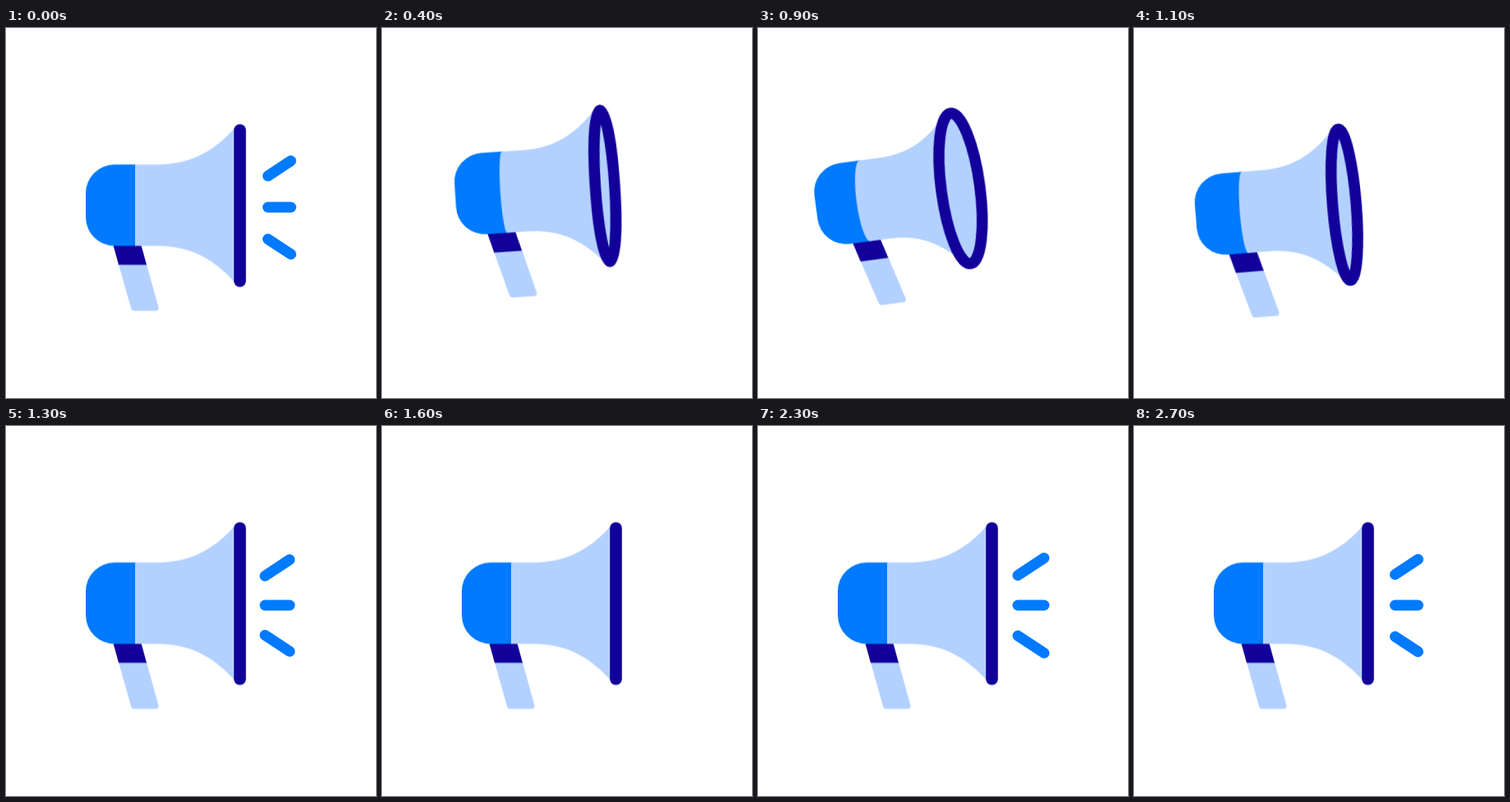
An HTML page without scripts that plays this animation: 450x450 px, repeating every 3.4 s.

```html
<!DOCTYPE html>
<html lang="en">
<head>
<meta charset="utf-8">
<title>Megaphone</title>
<style>
  @property --open { syntax: "<number>"; inherits: true; initial-value: 0; }

  html, body { margin: 0; width: 100%; height: 100%; overflow: hidden; background: #fff; }
  svg { display: block; width: 100%; height: 100%; }

  .bright { fill: #007aff; }
  .pale { fill: #b3d1ff; }
  .navy { fill: #12009a; }

  /* --open turns the mouth of the horn towards the viewer */
  .megaphone { animation: swing 3400ms step-end infinite; }
  .cap { transform: translateX(calc(var(--open) * -.66px)); }
  .seam { rx: calc(var(--open) * 1.35px); ry: 49.5px; }
  .horn { transform: translateX(calc(var(--open) * -.66px)) scaleX(calc(1 - var(--open) * .0104)); }
  .rim {
    transform: translateX(calc(127.5px - var(--open) * 2px));
    stroke: #12009a;
    stroke-linecap: round;
  }
  .mouth { rx: calc(var(--open) * 3.1px); ry: 92.25px; stroke-width: 13.5px; }
  .edge { stroke-width: 14.6px; opacity: calc(1 - var(--open) * 10); }

  .rays {
    fill: none;
    stroke: #007aff;
    stroke-width: 13px;
    stroke-linecap: round;
    animation: burst 3400ms step-end infinite;
  }

  @keyframes swing {
    0%     { transform: translate(0px, 0px) rotate(0deg); --open: 0; animation-timing-function: steps(2); }
    5.88%  { transform: translate(-1.5px, -7px) rotate(-1.3deg); --open: 1.3; animation-timing-function: steps(2); }
    11.76% { transform: translate(-5.5px, -16px) rotate(-3.8deg); --open: 3.8; animation-timing-function: steps(3); }
    20.58% { transform: translate(-13.6px, -20px) rotate(-7.55deg); --open: 7.55; animation-timing-function: steps(2); }
    26.47% { transform: translate(-22px, -6px) rotate(-7.6deg); --open: 7.6; }
    29.41% { transform: translate(-25px, 3px) rotate(-6.3deg); --open: 6.3; }
    32.35% { transform: translate(-19px, 8.5px) rotate(-4.64deg); --open: 4.64; }
    35.29% { transform: translate(-9px, 13px) rotate(-1.7deg); --open: 1.7; }
    38.23% { transform: translate(0px, 0px) rotate(0deg); --open: 0; }
    47.05% { transform: translate(0px, 0px) rotate(0deg); --open: 0; animation-timing-function: steps(2); }
    52.94% { transform: translate(-10px, 3px) rotate(-7.2deg); --open: 0; }
    58.82% { transform: translate(-9px, 2.8px) rotate(-6.65deg); --open: 0; }
    61.76% { transform: translate(-4px, 1.2px) rotate(-3deg); --open: 0; }
    64.7%, 100% { transform: translate(0px, 0px) rotate(0deg); --open: 0; }
  }

  /* dash length, then distance travelled along the ray */
  @keyframes burst {
    0%     { stroke-dasharray: 28 200; stroke-dashoffset: -18.5; visibility: visible; }
    2.94%  { stroke-dasharray: 27 200; stroke-dashoffset: -26; }
    5.88%  { stroke-dasharray: 15 200; stroke-dashoffset: -40; }
    8.82%  { visibility: hidden; }
    35.29% { stroke-dasharray: 9 200; stroke-dashoffset: -12; visibility: visible; }
    38.23% { stroke-dasharray: 30 200; stroke-dashoffset: -15; }
    41.17% { stroke-dasharray: 27 200; stroke-dashoffset: -25; }
    44.11% { stroke-dasharray: 14 200; stroke-dashoffset: -39; }
    47.05% { visibility: hidden; }
    64.7%  { stroke-dasharray: 9 200; stroke-dashoffset: -12; visibility: visible; }
    67.64% { stroke-dasharray: 32 200; stroke-dashoffset: -16; }
    70.58%, 100% { stroke-dasharray: 28 200; stroke-dashoffset: -17.5; visibility: visible; }
  }
</style>
</head>
<body>
<svg viewBox="0 0 450 450">
  <g transform="translate(157 215.5)">
    <g class="megaphone">
      <path class="pale" d="M-20 72H14L28.5 124.5Q29 128.500 25 128.500H0Q-4 128.500 -5 125Z"/>
      <path class="navy" d="M-27 47H7L14 72.500H-20Z"/>
      <g class="cap">
        <path class="bright" d="M1 -49.500H-25A35 35 0 0 0 -60 -14.500V14.500A35 35 0 0 0 -25 49.500H1Z"/>
        <ellipse class="seam pale"/>
      </g>
      <path class="horn pale" d="M0 -49.500H28C70 -49.500 100 -69 122 -95V95C100 69 70 49.500 28 49.500H0Z"/>
      <g class="rim">
        <ellipse class="mouth pale" cy=".5"/>
        <path class="edge" d="M0 -91.300V92.300"/>
      </g>
    </g>
  </g>
  <g class="rays">
    <path pathLength="60" d="M300 192.200L360 152.600"/>
    <path pathLength="60" d="M300 218H360"/>
    <path pathLength="60" d="M300 244.500L360 284.100"/>
  </g>
</svg>
</body>
</html>
```
